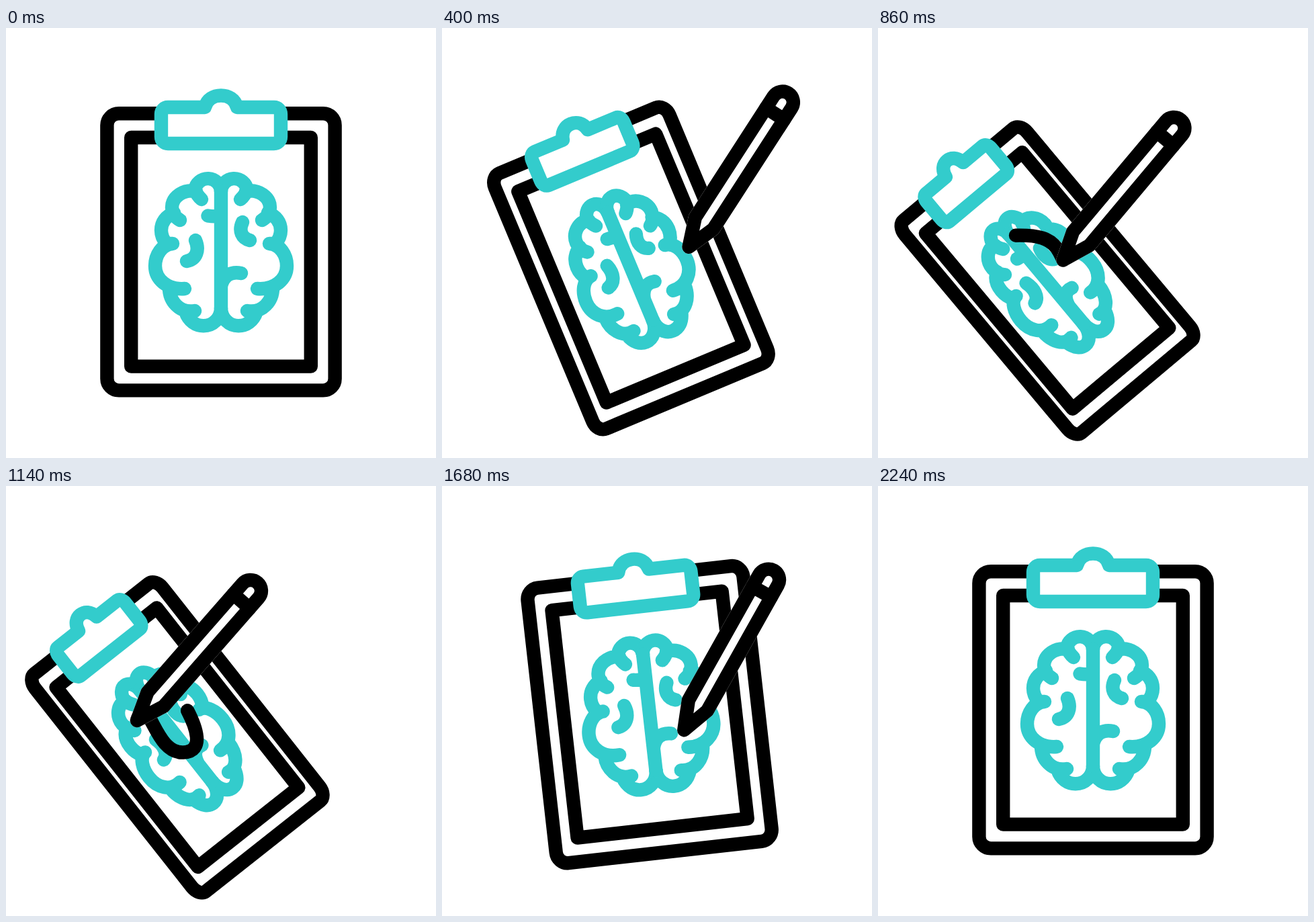
Animation of 640x640 px, one loop 2400 ms. Source, as an HTML page:

```html
<!DOCTYPE html>
<html lang="en">
<head>
<meta charset="utf-8">
<title>Clipboard</title>
<style>
  html, body { margin: 0; width: 100%; height: 100%; overflow: hidden; background: #fff; }
  svg { display: block; width: 100%; height: 100%; }
  path, rect { vector-effect: non-scaling-stroke; }
  .line { fill: none; stroke-width: 20.4px; stroke-linecap: round; stroke-linejoin: round; }
  .black { stroke: #000; }
  .teal { stroke: #3cc; }
  .white { stroke: #fff; fill: #fff; }
  .solid { fill: #fff; }
</style>
</head>
<body>
<svg viewBox="0 0 640 640">
  <defs>
    <path id="half" d="M320 243A19.600 19.600 0 0 0 281 241Q285 250 291 255
      M283 243C264 239 247 252 247 267Q248 280 259 286
      M250 275C238 280 231 289 231 301Q231 312 239 321H248
      M248 321C232 322 222 338 222 354C222 374 240 390 266 388
      M243 387C243 406 258 425 281 421
      M267 422C272 437 283 443.300 294 443.300C308 443.300 320 432 320 417"/>
    <path id="pencil" d="M0 0L-16 -42V-256.5A16 16 0 0 1 16 -256.5V-42Z"/>
  </defs>
  <g id="board">
    <rect class="line black" x="150.4" y="127.2" width="339.2" height="412.2" rx="17.5"/>
    <rect class="line black" x="186.2" y="163" width="267.6" height="340.6"/>
    <path class="line teal solid" d="M241 118H296C299 106 309 100.5 320 100.5S341 106 344 118H399
      A10 10 0 0 1 409 128V162A10 10 0 0 1 399 172H241A10 10 0 0 1 231 162V128A10 10 0 0 1 241 118Z"/>
    <g class="line teal">
      <use href="#half"/>
      <use href="#half" transform="matrix(-1 0 0 1 640 0)"/>
      <path d="M320 243V417M320 280Q309 281 300.500 279.500M282 316C288 330 284 344 269 347
        M352 289C346 302 351 313 363 316M350 365C335 362 324 368 320 384"/>
    </g>
  </g>
  <path id="trail" class="line black" d="M205 308.700C235 308 258 311 270 334C282 357 297 395 264 396.500
    C237 398 224 363 214 346C209 336 197 338 195 349"/>
  <g id="pen">
    <use href="#pencil" class="line white"/>
    <use href="#pencil" class="line black solid"/>
    <path class="line black" d="M-16 -236H16"/>
  </g>
</svg>
<script>
const LOOP = 2400, PEN = 256.5;
const $ = id => document.getElementById(id);
const board = $('board'), pen = $('pen'), trail = $('trail');
const trailLen = trail.getTotalLength();

const mix = (a, b, k) => a + (b - a) * k;
const span = (t, a, b) => Math.min(1, Math.max(0, (t - a) / (b - a)));
const smooth = (t, a, b) => { const s = span(t, a, b); return s * s * (3 - 2 * s); };

// cubic-bezier(a, 0, b, 1)
function ease(a, b, x) {
  let lo = 0, hi = 1, u = 0.5;
  for (let i = 0; i < 30; i++) {
    u = (lo + hi) / 2;
    const v = 1 - u;
    if (3 * u * v * v * a + 3 * u * u * v * b + u * u * u < x) lo = u; else hi = u;
  }
  return u * u * (3 - 2 * u);
}

function tilt(t) {
  return t < 795 ? ease(0.8, 0.2, span(t, -9, 789))
                 : 1 - ease(0.8, 0.2, span(t, 798, 2232));
}

// tip position and lean of the pencil
function penPose(t, head) {
  if (t < 680) {
    const r = ease(0.3, 0.6, t / 680);
    const lean = mix(-1.5, 39.4, 1 - Math.pow(1 - r, 1.58));
    return [mix(725, 205, r), 110.5 + PEN * Math.cos(lean * Math.PI / 180), lean];
  }
  if (t < 1140) {
    const p = trail.getPointAtLength(head * trailLen);
    return [p.x, p.y, mix(39.4, 41.2, head)];
  }
  const k = smooth(t, 1140, 1380), out = smooth(t, 1380, 2200);
  return [mix(mix(195, 200, k), 725, out), mix(mix(349, 355, k), 382, out),
          mix(mix(41.2, 42.9, k), -1.5, out)];
}

function draw(t) {
  const q = tilt(t);
  board.setAttribute('transform',
    `translate(${320 - 67.9 * q} ${333.4 + 42.7 * q}) rotate(${-40 * q}) scale(${1 - 0.3 * q} 1) translate(-320 -333.4)`);

  const head = smooth(t, 680, 1140), tail = smooth(t, 985, 1420);
  const [x, y, lean] = penPose(t, head);
  pen.setAttribute('transform', `translate(${x} ${y}) rotate(${lean})`);

  const len = (head - tail) * trailLen;
  trail.style.display = len > 0.5 ? '' : 'none';
  trail.style.strokeDasharray = `${len} ${trailLen * 2}`;
  trail.style.strokeDashoffset = -tail * trailLen;
}

const start = performance.now();
function tick() {
  draw((performance.now() - start) % LOOP);
  requestAnimationFrame(tick);
}
draw(0);
requestAnimationFrame(tick);
</script>
</body>
</html>
```
